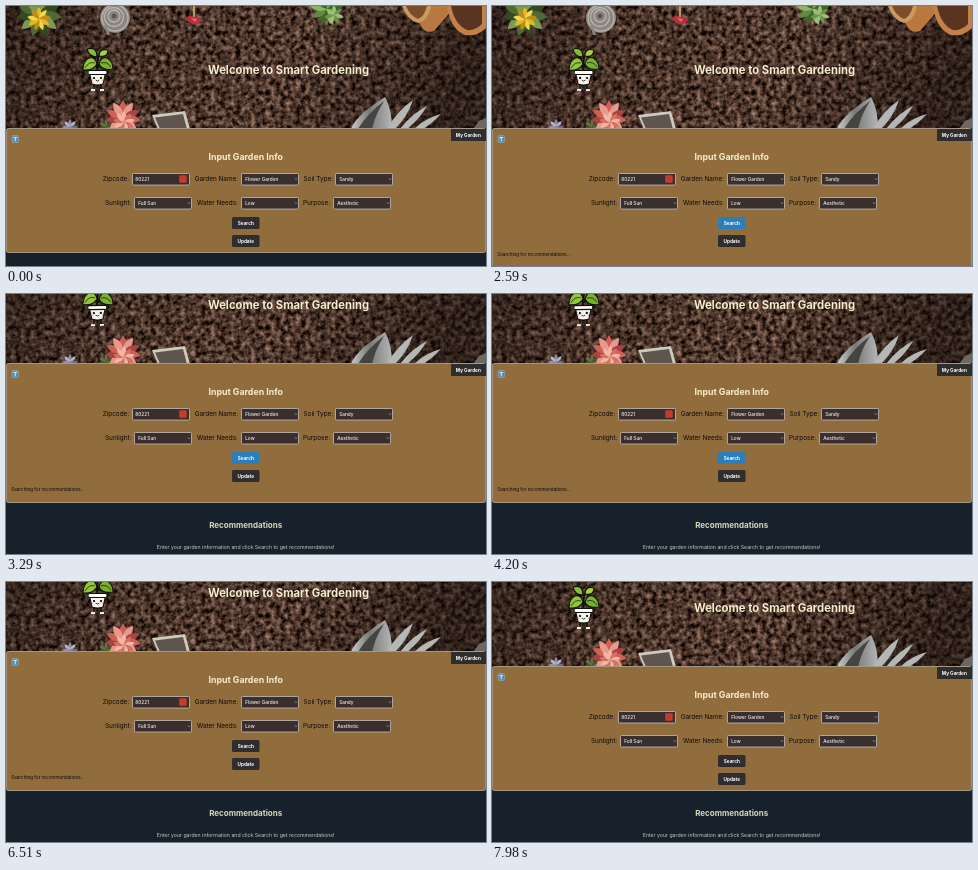
Write an HTML page that moves like this. It is 480x260 px and loops after 8000 ms.

```html
<!DOCTYPE html>
<html lang="en">
<head>
<meta charset="utf-8">
<title>Smart Gardening</title>
<style>
  html, body { margin: 0; width: 100%; height: 100%; overflow: hidden; background: #17212c; }
  svg { display: block; width: 100vw; height: 100vh; font-family: Inter, Roboto, sans-serif; }
  .mid { text-anchor: middle; }
  .head { font-weight: 700; fill: #f6edcd; }
  .label { font-size: 6.4px; fill: #0c0907; }
  .value { font-size: 4.75px; font-weight: 500; fill: #f4f1ee; }
  .btn { font-size: 4.7px; font-weight: 700; fill: #fff; }
</style>
</head>
<body>
<svg viewBox="0 0 480 260">
  <defs>
    <filter id="crumbs" x="0" y="0" width="1" height="1" color-interpolation-filters="sRGB">
      <feTurbulence type="fractalNoise" baseFrequency=".2" numOctaves="3" seed="4"/>
      <feColorMatrix values="1 0 0 0 -.19  .82 0 0 0 -.19  .7 0 0 0 -.17  0 0 0 0 1"/>
    </filter>
    <linearGradient id="shade" x2="1" y2=".12">
      <stop offset="0" stop-color="#100a07" stop-opacity=".5"/>
      <stop offset=".3" stop-color="#100a07" stop-opacity=".12"/>
      <stop offset=".65" stop-color="#100a07" stop-opacity="0"/>
      <stop offset="1" stop-color="#100a07" stop-opacity=".5"/>
    </linearGradient>
    <linearGradient id="steel" x2="1">
      <stop offset="0" stop-color="#c9cbc9"/>
      <stop offset=".45" stop-color="#777a7a"/>
      <stop offset="1" stop-color="#b3b6b4"/>
    </linearGradient>
    <clipPath id="hero"><rect width="480" height="122"/></clipPath>
  </defs>
  <rect width="480" height="260" fill="#17212c"/>
  <g id="page">
    <g clip-path="url(#hero)">
      <rect width="480" height="122" filter="url(#crumbs)"/>
      <rect width="480" height="122" fill="url(#shade)"/>
      <g id="blooms"></g>
      <!-- twine -->
      <circle cx="109" cy="12" r="15" fill="#8b8681"/>
      <g fill="none" stroke="#b9b4ad" stroke-width="1.3">
        <circle cx="109" cy="12" r="13"/><circle cx="108" cy="11" r="9.5"/><circle cx="108" cy="10" r="6"/>
      </g>
      <circle cx="108" cy="10" r="2.5" fill="#5c5651"/>
      <path d="M98 20q5 5 4 9" fill="none" stroke="#8b8681" stroke-width="3"/>
      <!-- red bloom on a stick -->
      <path d="M188-1v12" stroke="#b99b5a" stroke-width="2"/>
      <path d="M180 12q4-4 8-1 5-1 8 3-3 5-9 4-5-1-7-6z" fill="#b92f3c"/>
      <path d="M185 12l6 1-2 3z" fill="#e2697a"/>
      <!-- pots -->
      <path d="M403 0h46l-8 10-13 15q-9 3-13-5z" fill="#b9783f"/>
      <path d="M396 0h29q-3 15-13 17-11-3-16-17z" fill="#c99a62"/>
      <path d="M400 0h21q-3 11-9 13-8-3-12-13z" fill="#7d4c2a"/>
      <path d="M441 0h39v22q-9 9-21 7-15-6-18-29z" fill="#c48049"/>
      <path d="M445 0h31v18q-7 7-15 6-12-5-16-24z" fill="#593420"/>
      <!-- tag and tools -->
      <path d="M146 109l33-4 5 18h-32z" fill="#cfcac0"/>
      <path d="M149 111.500l28-3.500 4 15h-27z" fill="#5e564f"/>
      <path d="M345 123q5-14 34-32 7 12 7 32z" fill="url(#steel)"/>
      <path d="M352 123q9-15 26-28-9 14-12 28z" fill="#454441"/>
      <g fill="#b4b7b5">
        <path d="M381 123q10-18 26-29-5 16-18 29z"/>
        <path d="M394 123q11-15 27-23-8 14-20 23z"/>
        <path d="M408 123q11-11 27-15-8 9-18 15z"/>
      </g>
      <path d="M468 122l5-7 7-3v10z" fill="#6f6862"/>
    </g>

    <g id="plant" stroke="#0d120b" stroke-width="1.1" stroke-linejoin="round">
      <g id="leaves">
        <path d="M91.500 66q-1-9 1-17M91 62q-2-5-6-5M92 61q3-5 7-5" fill="none" stroke-width="2"/>
        <path d="M91 58q-2-8-8-6-6 3-6 12 10 1 14-6z" fill="#93c43c"/>
        <path d="M93 58q2-8 8-6 6 3 6 11-11 2-14-5z" fill="#78af30"/>
        <path d="M91 51q-8 0-10-8 10-3 10 8z" fill="#86bb37"/>
        <path d="M93 50q0-8 9-6 0 8-9 6z" fill="#a5cf4d"/>
        <path d="M89 57q-6-2-10 5M95 57q6-2 10 4" fill="none" stroke-width=".7"/>
      </g>
      <path d="M88 77v6M95 77v6" stroke-width="1.4"/>
      <path d="M83.500 67h16l-2.500 11q-5.500 2-11 0z" fill="#f7f4ed"/>
      <rect x="82" y="64.500" width="19" height="4" rx="1.500" fill="#fff"/>
      <path d="M85 84h4M94 84h4" stroke="#f0eee8" stroke-width="1.800"/>
      <g stroke="none">
        <circle cx="88" cy="72" r="1.100"/><circle cx="95" cy="72" r="1.100"/>
        <circle cx="86.500" cy="74.300" r=".8" fill="#f2a3a0"/><circle cx="96.500" cy="74.300" r=".8" fill="#f2a3a0"/>
      </g>
      <path d="M89.700 74q1.800 2.200 3.600 0" fill="none" stroke-width=".8"/>
    </g>
    <text class="mid head" x="283.300" y="68.300" font-size="11.300" fill-opacity=".5" style="fill:#1a0f0a">Welcome to Smart Gardening</text>
    <text class="mid head" x="282.600" y="67.500" font-size="11.300">Welcome to Smart Gardening</text>

    <rect id="panel" x=".4" y="122.500" width="479.200" rx="2" fill="#916d3e" stroke="#b9ad98" stroke-width=".8"/>
    <rect x="445" y="123" width="35" height="12" fill="#302d2e"/>
    <text class="mid btn" x="462.300" y="130.500">My Garden</text>
    <rect x="6" y="129.500" width="6.500" height="7" rx="1" fill="#5b8db5" stroke="#9fb0b5" stroke-width=".5"/>
    <path d="M7.500 131.500h3.500M9.300 131.500v3.800" fill="none" stroke="#e8eef0" stroke-width=".9"/>
    <text class="mid head" x="239.700" y="154.200" font-size="8.800">Input Garden Info</text>
    <g id="form"></g>
    <text id="status" x="5.200" y="249.600" font-size="4.600" fill="#0c0907">Searching for recommendations...</text>
    <g id="results">
      <text class="mid head" x="239.700" y="272" font-size="8" style="fill:#d9d6bf">Recommendations</text>
      <text class="mid" x="239.700" y="293" font-size="5.200" fill="#cbcac0">Enter your garden information and click Search to get recommendations!</text>
    </g>
  </g>
</svg>
<script>
const LOOP = 8000;
const HOVER = [800, 4250];      // Search button is blue
const SEARCH = [2100, 7200];    // status line is shown
const SCROLL = [2660, 3220];
const STATUS_H = 15, SCROLL_MAX = 53;

const $ = id => document.getElementById(id);
const add = (id, markup) => $(id).insertAdjacentHTML('beforeend', markup);
const clamp = v => Math.max(0, Math.min(1, v));
const ease = v => v * v * (3 - 2 * v);

// A rosette of pointed petals
function rosette(x, y, n, r, colors) {
  for (let i = 0; i < n; i++) {
    add('blooms', `<path d="M0 0q${r * 0.4} ${-r * 0.5} 0 ${-r}q${-r * 0.4} ${r * 0.5} 0 ${r}z" fill="${colors[i % colors.length]}" transform="translate(${x} ${y}) rotate(${i * 360 / n})"/>`);
  }
}

function field(label, lx, x, y, value, zip) {
  const end = zip
    ? `<rect x="173.200" y="${y + 2.300}" width="7.500" height="7.500" rx="1" fill="#c63b2c"/>`
    : `<path d="M${x + 54} ${y + 5.500}l1 1.200 1-1.200" fill="none" stroke="#c9c4c0" stroke-width=".6"/>`;
  const pad = zip ? 3.3 : 4.2;
  add('form', `<text class="label" x="${lx}" y="${y + 8}">${label}:</text>
    <rect x="${x + 0.5}" y="${y + 0.5}" width="57" height="11.500" rx=".8" fill="#382f2e" stroke="#c4beb7" stroke-width=".8"/>
    <text class="value" x="${x + pad}" y="${y + 7.900}">${value}</text>${end}`);
}

function button(id, label, y) {
  add('form', `<rect id="${id}" x="226" y="${y}" width="27.500" height="12" rx="1.500" fill="#302d2e"/>
    <text class="mid btn" x="239.800" y="${y + 7.600}">${label}</text>`);
}

rosette(33, 8, 11, 23, ['#4d6b33', '#7c9a55', '#34491f']);
rosette(33, 13, 9, 12, ['#e3b91f', '#f2d548', '#c08e18']);
rosette(321, 3, 9, 17, ['#5f8a3f', '#8db565', '#41652c']);
rosette(328, 9, 7, 10, ['#9cc07a', '#6c954a']);
rosette(64, 121, 8, 8, ['#8d90ab', '#b6b4c6', '#6d6f8b']);
rosette(100, 121, 7, 8, ['#5f7440', '#46592c']);
rosette(117, 112, 11, 18, ['#cf6058', '#e79a8c', '#a84443']);
rosette(118, 116, 9, 11, ['#efb9a8', '#d9705f']);

field('Zipcode', 96.7, 126, 167, '80221', true);
field('Garden Name', 188.700, 235, 167, 'Flower Garden');
field('Soil Type', 297.500, 329, 167, 'Sandy');
field('Sunlight', 99, 128, 191, 'Full Sun');
field('Water Needs', 191, 235, 191, 'Low');
field('Purpose', 297, 327, 191, 'Aesthetic');
button('search', 'Search', 211);
button('update', 'Update', 229);

const mix = (a, b, k) => `rgb(${a.map((v, i) => Math.round(v + (b[i] - v) * k))})`;

function draw(t) {
  const searching = t >= SEARCH[0] && t < SEARCH[1];
  const extra = searching ? STATUS_H : 0;
  const wanted = SCROLL_MAX * ease(clamp((t - SCROLL[0]) / (SCROLL[1] - SCROLL[0])));
  const scroll = Math.min(wanted, SCROLL_MAX - STATUS_H + extra);
  $('page').setAttribute('transform', `translate(0 ${-scroll})`);
  $('panel').setAttribute('height', 124 + extra);
  $('status').setAttribute('visibility', searching ? 'visible' : 'hidden');
  $('results').setAttribute('transform', `translate(0 ${extra})`);

  const hover = clamp((t - HOVER[0]) / 150) - clamp((t - HOVER[1]) / 150);
  $('search').setAttribute('fill', mix([48, 45, 46], [44, 126, 184], hover));

  const sway = Math.sin(t / 1000 * 2 * Math.PI);
  $('leaves').setAttribute('transform', `rotate(${sway * 2.5} 92 67)`);
  $('plant').setAttribute('transform', `rotate(${-sway * 0.7} 92 85)`);
}

function tick(now) {
  draw(now % LOOP);
  requestAnimationFrame(tick);
}
draw(0);
requestAnimationFrame(tick);
</script>
</body>
</html>
```
